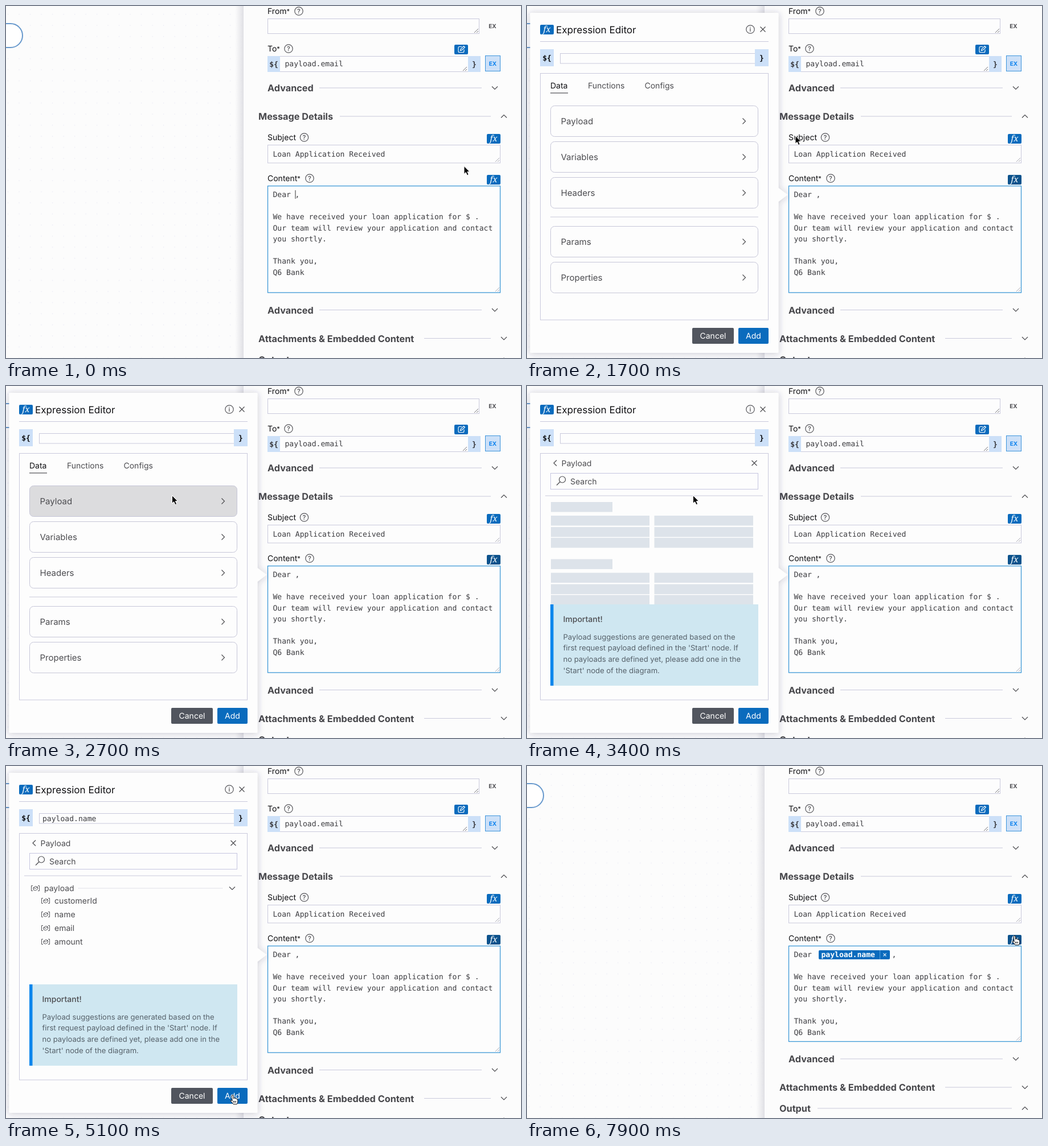
An HTML page that plays this animation: 904 px wide and 619 px high, repeating every 8 s.

```html
<!DOCTYPE html>
<html lang="en">
<head>
<meta charset="utf-8">
<title>Expression editor</title>
<style>
html, body { margin: 0; width: 100%; height: 100%; overflow: hidden; background: #fcfcfc; }
svg { display: block; width: 904px; height: 619px; }
text { font-family: Inter, Roboto, sans-serif; font-size: 14px; fill: #4c4c50; white-space: pre; text-rendering: geometricPrecision; }
.head { font-size: 16.25px; font-weight: 700; fill: #47474b; }
.title { font-size: 17.1px; fill: #111114; }
.card { font-size: 15px; }
.note { font-size: 13.07px; fill: #56616a; }
.mono { font-family: "DejaVu Sans Mono", "Noto Sans Mono", monospace; font-size: 13.09px; fill: #3c3c40; }
.label { fill: #111114; }
.fx { font: italic 15px "Noto Serif", serif; fill: #fff; text-anchor: middle; }
.mid { text-anchor: middle; }
.white { fill: #fff; }
.bold { font-weight: 700; }
</style>
</head>
<body>
<svg id="stage" viewBox="0 0 904 619"></svg>
<script>
const EDGE = '#c9c9dc', BLUE = '#0a6bbd', DARK = '#0c528c', PALE = '#cce0f8', BONE = '#dde3ea';

const rect = (x, y, w, h, fill, extra = '') =>
  `<rect x="${x}" y="${y}" width="${w}" height="${h}" fill="${fill}" ${extra}/>`;
const box = (x, y, w, h, stroke = EDGE, extra = '') =>
  rect(x, y, w, h, '#fdfdfd', `stroke="${stroke}" ${extra}`);
const text = (x, y, s, cls = '') => `<text x="${x}" y="${y}" class="${cls}">${s}</text>`;
const path = (d, stroke = '#4c4c50', w = 1.2, extra = '') =>
  `<path d="${d}" fill="none" stroke="${stroke}" stroke-width="${w}" ${extra}/>`;
const line = (x1, x2, y, stroke = EDGE, extra = '') => path(`M${x1} ${y}H${x2}`, stroke, 1.2, extra);
const group = (id, body) => `<g id="${id}">${body}</g>`;

const down = (x, y) => path(`M${x - 5} ${y - 2.5}l5 5 5-5`);
const up = (x, y) => path(`M${x - 5} ${y + 2.5}l5-5 5 5`);
const right = (x, y) => path(`M${x - 2.5} ${y - 5}l5 5-5 5`);
const cross = (x, y, r = 4.5, c = '#4c4c50') =>
  path(`M${x - r} ${y - r}l${2 * r} ${2 * r}m0 ${-2 * r}l${-2 * r} ${2 * r}`, c);
const grip = (x, y, c = '#77777c') => path(`M${x - 7} ${y}l7-7M${x - 3} ${y}l3-3`, c, 1);
const badge = (x, y, s) => `<circle cx="${x}" cy="${y}" r="7.2" fill="none" stroke="#55555a" stroke-width="1.2"/>` +
  `<text x="${x}" y="${y + 4}" class="mid" style="font-size:11px;font-weight:500">${s}</text>`;
const field = (s, y, bx) => text(459, y + 5, s, 'label') + badge(bx, y, '?');
const star = '<tspan dy="-1" font-size="11">*</tspan>';
const fxButton = (x, y, id = '') =>
  rect(x, y, 24, 17, BLUE, `rx="2" ${id && `id="${id}"`}`) + text(x + 12, y + 13, 'fx', 'fx');
const section = (s, x, y, x1, arrow) => {
  const end = x > 450 ? 835 : 851;
  return text(x, y + 6, s, 'head') + line(x1, end, y) + arrow(end + 23, y);
};

const canvas = `
  <defs>
    <pattern id="dots" width="19.5" height="19.5" patternUnits="userSpaceOnUse">${rect(3, 14, 1.2, 1.2, '#e4e4f2')}</pattern>
    <linearGradient id="shade"><stop stop-color="#e4e4e8" stop-opacity="0"/><stop offset="1" stop-color="#dfdfe4"/></linearGradient>
    <filter id="soft" x="-10%" y="-10%" width="120%" height="120%">
      <feDropShadow dx="0" dy="1" stdDeviation="6" flood-color="#30305a" flood-opacity=".26"/>
    </filter>
  </defs>
  ${rect(0, 0, 904, 619, '#fcfcfc')}${rect(0, 0, 417, 619, 'url(#dots)')}
  ${rect(-60, 31, 89, 42, '#fff', 'rx="21" stroke="#6698cc" stroke-width="2"')}
  ${rect(402, 0, 15, 619, 'url(#shade)')}${rect(417, 0, 487, 619, '#fcfcfc')}`;

const letter = ['We have received your loan application for $ .',
  'Our team will review your application and contact', 'you shortly.', '', 'Thank you,', 'Q6 Bank'];

const form =
  field('From' + star, 9, 514) + box(459.5, 22.5, 371, 26) + grip(829, 47) +
  '<text x="854" y="39" class="mid bold" style="font-size:10px">EX</text>' +
  field('To' + star, 75, 496) + rect(787, 68, 24, 17, BLUE, 'rx="2"') +
  path('M800 71.5h-4q-2 0-2 2v6q0 2 2 2h6q2 0 2-2v-3M797.5 78.5l.8-3 5.2-5 2 2-5.2 5z', '#fff', 1.1) +
  box(459.5, 88.5, 373, 27) + rect(459, 88, 22, 28, PALE) + rect(811, 88, 22, 28, PALE) +
  text(470, 106.5, '${', 'mono mid bold') + text(822, 106.5, '}', 'mono mid bold') +
  text(489.5, 106, 'payload.email', 'mono') + grip(809, 114) +
  rect(841.5, 87.5, 26, 27, PALE, 'stroke="#3c94dc"') +
  '<text x="854.5" y="105" class="mid bold" style="font-size:10px;fill:#0a80ee">EX</text>' +
  section('Advanced', 459, 144, 550, down) +
  section('Message Details', 443, 194, 586, up) +
  field('Subject', 231, 523.5) + fxButton(844, 225) +
  box(459.5, 244.5, 408, 31.5) + text(468.5, 264.5, 'Loan Application Received', 'mono') + grip(866, 274, '#aaaab4') +
  field('Content' + star, 303, 533) + fxButton(844, 297, 'launch') +
  box(459.5, 316.5, 408, 187.5, '#3d98d6', 'id="area" stroke-width="1.3"') +
  text(468.5, 336, 'Dear', 'mono') +
  letter.map((s, i) => text(468.5, 375 + i * 19.6, s, 'mono')).join('') +
  group('plain', text(507.5, 336, ',', 'mono') + rect(507.5, 324, 1, 15, '#333', 'id="caret"')) +
  group('chip', rect(512, 324, 125, 16, BLUE, 'rx="2"') + text(516.5, 336, 'payload.name', 'mono bold white') +
    path('M619.5 324v16', '#5aa2de', 1) + cross(628, 332, 2.5, '#d5e8f8') + text(640.5, 336, ',', 'mono')) +
  group('tail', grip(866, 502, '#aaaab4') +
    section('Advanced', 459, 534.5, 550, down) +
    section('Attachments &amp; Embedded Content', 443, 584.5, 734, down) +
    section('Output', 443, 621.5, 510, up));

const cardTops = [175.5, 238.5, 301.5, 387.5, 450.5];
const cards = ['Payload', 'Variables', 'Headers', 'Params', 'Properties'].map((s, i) => {
  const y = cardTops[i];
  return box(41.5, y, 364, 54, '#c6c6d8', `rx="7" id="card${i}"`) + text(59.5, y + 32.3, s, 'card') + right(381, y + 27);
}).join('');

const bars = y => rect(42, y, 108, 17.5, BONE) + [24, 44, 63].map(d =>
  rect(42, y + d, 173, 17.5, BONE) + rect(223.5, y + d, 173.5, 17.5, BONE)).join('');
const cube = (x, y) => path(`M${x + 3} ${y - 4.5}h-2.5v9h2.5M${x + 12} ${y - 4.5}h2.5v9h-2.5` +
  `M${x + 4} ${y - 1}l4-2.5 3.5 1.5v3.5l-4 2.5-3.5-1.5zl3.5 1.5 4-3`, '#55555a', 1);
const rows = ['customerId', 'name', 'email', 'amount'].map((s, i) => {
  const y = 237 + i * 24;
  return rect(61, y - 9, 342, 17.5, '#dadada', `id="row${i}"`) + cube(62, y) + text(85, y + 5, s);
}).join('');

const note = ['Payload suggestions are generated based on the', "first request payload defined in the 'Start' node. If",
  'no payloads are defined yet, please add one in the', "'Start' node of the diagram."];

const popup = group('popup',
  '<path d="M7.500 12H439.500q2 0 2 2V320l16 12-16 12V608q0 2-2 2H7.500q-2 0-2-2V14q0-2 2-2z" fill="#fdfdfd" filter="url(#soft)"/>' +
  fxButton(23, 33) + text(51, 47.5, 'Expression Editor', 'title') + badge(392, 41, 'i') + cross(414, 41) +
  line(23, 424, 62.5) +
  box(58.5, 83.5, 342, 17.5, EDGE, 'id="input"') + group('value', text(64, 97, 'payload.name', 'mono')) +
  rect(23, 76, 24, 30, PALE) + rect(400, 76, 24, 30, PALE) +
  text(35, 96, '${', 'mono mid bold label') + text(412, 96, '}', 'mono mid bold label') +
  box(23.5, 118.5, 400, 433.5) +
  group('menu', text(41, 145, 'Data', 'label') + text(107, 145, 'Functions') + text(206.5, 145, 'Configs') +
    line(41, 72, 153, '#4c4c50') + cards + line(41, 406, 371)) +
  group('browse', path('M52 130.500l-5 5 5 5') + text(60.5, 140.5, 'Payload') + cross(399, 135.5) +
    box(41.5, 153.5, 364, 28, '#c6c6e0') +
    '<circle cx="62" cy="164.500" r="5.500" fill="none" stroke="#4c4c50" stroke-width="1.200"/>' + path('M58 168.500l-6 6') +
    text(76, 172.5, 'Search') + line(32, 414, 193) +
    group('bones', bars(204) + bars(304.5)) +
    group('tree', cube(44, 215) + text(67, 220, 'payload') + line(127, 380, 215, '#c6c6d4', 'stroke-dasharray="1 1"') + down(397, 215) + rows) +
    rect(41, 384, 365, 143, '#cfe7f1') + rect(41, 384, 5.5, 143, '#0c86ec') +
    '<text x="63.500" y="415" font-weight="500">Important!</text>' +
    note.map((s, i) => text(63.5, 445.5 + i * 19.7, s, 'note')).join('')) +
  rect(290, 566, 73, 28, '#51555e', 'rx="2"') + text(326.5, 585, 'Cancel', 'mid white') +
  rect(371, 566, 53, 28, BLUE, 'rx="2"') + text(397.5, 585, 'Add', 'mid white'));

const pointer = group('pointer',
  '<path id="arrow" d="M0 0v14l3.200-3 2.300 5.200 2.600-1.100-2.300-5h4.200z" fill="#000" stroke="#fff"/>' +
  '<path id="hand" d="M-1.500 1q0-1.600 1.300-1.600t1.400 1.600l.6 5 .3-1.300q2.200-.6 2.400 1.100 2-.5 2.300.9 2-.3 2 1.500v3q0 2-1.400 4.500H1q-1.500-2.500-4.600-5.400-.7-1.800 1.400-1.400l1.300 1.200zM3.200 10v3M5.300 10v3M1.200 10v3" fill="#fff" stroke="#111" stroke-linejoin="round"/>' +
  '<path id="beam" d="M-3-7q3 0 3 2 0-2 3-2M0-5V5M-3 7q3 0 3-2 0 2 3 2M-1.500 1h3" fill="none" stroke="#222" stroke-width="1.300"/>');

const stage = document.getElementById('stage');
stage.innerHTML = canvas + form + popup + pointer;

const el = id => document.getElementById(id);
const show = (id, on) => el(id).setAttribute('visibility', on ? 'inherit' : 'hidden');
const ease = p => p * p * (3 - 2 * p);
const ramp = (t, a, b) => Math.max(0, Math.min(1, (t - a) / (b - a)));
const inside = ([x, y], l, t, r, b) => x >= l && x <= r && y >= t && y <= b;

// pointer stops: time, x, y
const stops = [[0, 804, 281.5], [250, 804, 281.5], [700, 862, 306], [1200, 862, 306], [2000, 291.5, 192.5], [3600, 291.5, 192.5],
  [4050, 153, 268], [4550, 153, 268], [5100, 398, 579], [5500, 398, 579], [6000, 665, 460], [6700, 665, 460],
  [7400, 856, 299], [8000, 856, 299]];

function pointAt(t) {
  const i = stops.findIndex(s => s[0] > t);
  const [a, x, y] = stops[i - 1], [b, u, v] = stops[i];
  const p = ease(ramp(t, a, b));
  return [x + (u - x) * p, y + (v - y) * p];
}

function draw(t) {
  const at = pointAt(t);
  const open = t >= 900 && t < 5400, added = t >= 5400;
  const browsing = t >= 2900, listed = t >= 3700;

  show('popup', open);
  el('popup').setAttribute('opacity', ramp(t, 880, 1050));
  el('input').setAttribute('width', 3 + 339 * ease(ramp(t, 1080, 1450)));
  show('value', open && t >= 4500);
  show('menu', open && !browsing);
  show('browse', open && browsing);
  show('bones', open && browsing && !listed);
  show('tree', open && listed);
  cardTops.forEach((y, i) => el('card' + i).setAttribute('fill',
    open && inside(at, 41, y, 406, y + 54) ? '#dcdcde' : '#fdfdfd'));
  let onRow = false;
  for (let i = 0; i < 4; i++) {
    const y = 237 + i * 24, on = open && listed && inside(at, 61, y - 12, 403, y + 12);
    show('row' + i, on);
    onRow = onRow || on;
  }

  show('plain', !added);
  show('caret', !added && !open && t < 700);
  show('chip', added);
  el('area').setAttribute('height', added ? 168 : 187.5);
  el('tail').setAttribute('transform', `translate(0 ${added ? -19.5 : 0})`);

  const onFx = inside(at, 844, 297, 868, 314);
  el('launch').setAttribute('fill', open || onFx ? DARK : BLUE);
  const onAdd = open && inside(at, 371, 566, 424, 594);
  const hand = onFx || onRow || onAdd;
  const beam = !hand && (inside(at, 459, 316, 868, added ? 485 : 504) || inside(at, 459, 244, 868, 276));
  show('hand', hand);
  show('beam', beam);
  show('arrow', !hand && !beam);
  el('pointer').setAttribute('transform', `translate(${at[0]} ${at[1]})`);
}

const start = performance.now();
function tick() {
  draw((performance.now() - start) % 8000);
  requestAnimationFrame(tick);
}
tick();
</script>
</body>
</html>
```
